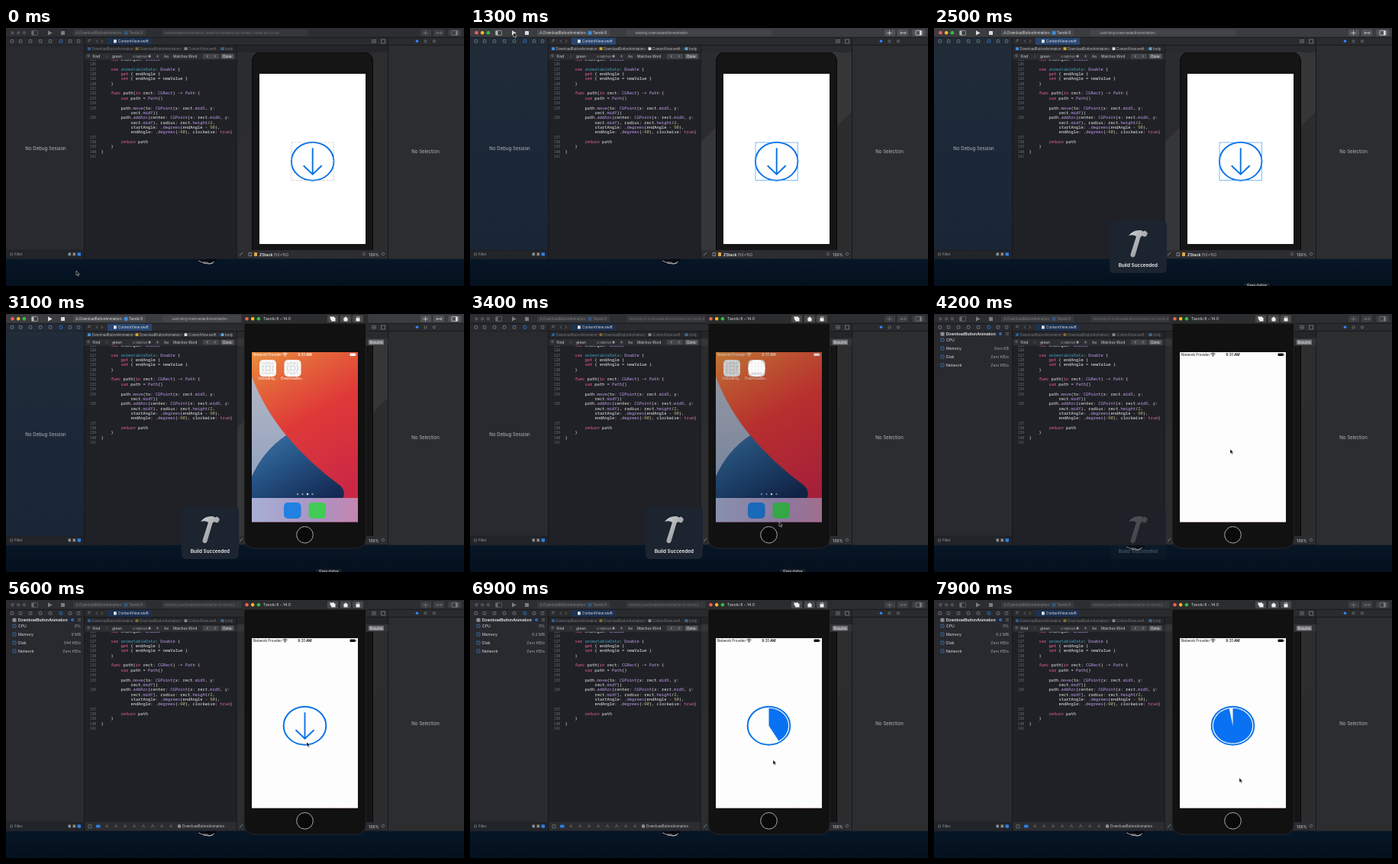
Animation of 600 by 338 pixels, one loop 8 s. Source, as an HTML page:

```html
<!DOCTYPE html>
<html lang="en">
<head>
<meta charset="utf-8">
<title>Download button demo</title>
<style>
html, body { margin: 0; width: 100%; height: 100%; overflow: hidden; background: #06101c; }
svg { display: block; width: 100vw; height: 100vh; }
text { font-family: Inter, "Open Sans", sans-serif; }
.code text { font-family: "Noto Sans Mono", "DejaVu Sans Mono", monospace; font-size: 5.42px; font-weight: 500; }
</style>
</head>
<body>
<svg id="stage" viewBox="0 0 600 338" preserveAspectRatio="none"></svg>
<script>
const LOOP = 8000;
const DEVICE = "Tavoki 8";
const APP = "DownloadButtonAnimation";
const BLUE = "#0a73e6";

const rect = (x, y, w, h, fill, more = "") =>
  `<rect x="${x}" y="${y}" width="${w}" height="${h}" fill="${fill}" ${more}/>`;
const dot = (x, y, r, fill, more = "") => `<circle cx="${x}" cy="${y}" r="${r}" fill="${fill}" ${more}/>`;
const line = (d, stroke, width = 0.7, more = "") =>
  `<path d="${d}" fill="none" stroke="${stroke}" stroke-width="${width}" ${more}/>`;
const label = (x, y, size, str, fill = "#bbb", more = "") =>
  `<text x="${x}" y="${y}" font-size="${size}" fill="${fill}" ${more}>${str}</text>`;
const group = (id, body, more = "") => `<g id="${id}" ${more}>${body}</g>`;
const MID = ' text-anchor="middle"', END = ' text-anchor="end"', BOLD = ' font-weight="600"';

const LIGHTS = ["#fc5b57", "#fdbc2e", "#29c740"];
const GREYS = LIGHTS.map(() => "#505155");
const lights = (x, colors = LIGHTS) => colors.map((c, i) => dot(x + i * 7.7, 6.3, 2.2, c)).join("");

const downArrow = (x, y) =>
  line(`M${x} ${y - 17.5}V${y + 17}M${x - 12} ${y + 5.5}L${x} ${y + 17}L${x + 12} ${y + 5.5}`, BLUE, 1.9);
const ring = (x, y) =>
  `<ellipse cx="${x}" cy="${y}" rx="27.8" ry="25" fill="none" stroke="${BLUE}" stroke-width="2"/>`;

// Source editor: [line number, indent, text]
const CODE = [
  [125, 4, "var endAngle: Double"], [126, 0, ""],
  [127, 4, "var animatableData: Double {"],
  [128, 8, "get { endAngle }"], [129, 8, "set { endAngle = newValue }"],
  [130, 4, "}"], [131, 0, ""],
  [132, 4, "func path(in rect: CGRect) -> Path {"],
  [133, 8, "var path = Path()"], [134, 0, ""],
  [135, 8, "path.move(to: CGPoint(x: rect.midX, y:"], ["", 12, "rect.midY))"],
  [136, 8, "path.addArc(center: CGPoint(x: rect.midX, y:"],
  ["", 12, "rect.midY), radius: rect.height/2,"],
  ["", 12, "startAngle: .degrees(endAngle - 90),"],
  ["", 12, "endAngle: .degrees(-90), clockwise: true)"],
  [137, 0, ""], [138, 8, "return path"], [139, 4, "}"], [140, 0, "}"], [141, 0, ""]
];
const TOKENS = [
  [/^(var|get|set|func|in|return|true)$/, "#f7619f"],
  [/^(Double|CGRect|CGPoint|Path|midX|midY|height|addArc|move|degrees)$/, "#c79ff5"],
  [/^animatableData$/, "#42a2bd"],
  [/^\d+$/, "#d0bf69"]
];
const colorize = str => str.replace(/>/g, "\u203a").replace(/\w+/g, word => {
  const hit = TOKENS.find(([pattern]) => pattern.test(word));
  return hit ? `<tspan fill="${hit[1]}">${word}</tspan>` : word;
}).replace(/\u203a/g, "&gt;");
const code = CODE.map(([num, indent, str], i) => {
  const y = 43 + i * 6.35;
  return `<text x="118" y="${y}" fill="#74757a" style="font-size:4.6px" ${END}>${num}</text>`
    + `<text x="${124.4 + indent * 3.25}" y="${y}" fill="#ececee">${colorize(str)}</text>`;
}).join("");

const defs = `<defs>
  <linearGradient id="sea" x2="0" y2="1"><stop stop-color="#0b1a2b"/><stop offset=".9" stop-color="#071626"/><stop offset="1" stop-color="#04101d"/></linearGradient>
  <linearGradient id="side" x2="0" y2="1"><stop stop-color="#222c39"/><stop offset=".5" stop-color="#1c2838"/><stop offset="1" stop-color="#1a2636"/></linearGradient>
  <linearGradient id="warm" x2=".35" y2="1"><stop stop-color="#ea9040"/><stop offset=".22" stop-color="#e4653a"/><stop offset=".5" stop-color="#df3a38"/><stop offset="1" stop-color="#cb2745"/></linearGradient>
  <linearGradient id="wave" x2=".8" y2="1"><stop stop-color="#3a74a8"/><stop offset=".5" stop-color="#245081"/><stop offset="1" stop-color="#142a54"/></linearGradient>
  <linearGradient id="pale" x2="0" y2="1"><stop stop-color="#b3b6c4"/><stop offset="1" stop-color="#93a3c0"/></linearGradient>
  <linearGradient id="dock"><stop stop-color="#a7b0d4"/><stop offset=".6" stop-color="#aa94c4"/><stop offset="1" stop-color="#c486ae"/></linearGradient>
  <linearGradient id="metal" x2="1" y2="1"><stop stop-color="#d0d1d3"/><stop offset="1" stop-color="#85898d"/></linearGradient>
  <clipPath id="codeClip"><rect x="103" y="41.5" width="199" height="249"/></clipPath>
  <clipPath id="canvasClip"><rect x="302" y="32" width="198" height="259"/></clipPath>
  <clipPath id="screenClip"><rect x="322" y="50" width="139" height="222.5"/></clipPath>
</defs>`;

const desktop = rect(0, 0, 600, 338, "url(#sea)")
  + `<path d="M250 306l6-3 5 1 4-3 9 1 3 4-7 1-5 3-9-1z" fill="#04080d"/>`
  + line("M252 305l5 2 6 0 4 2 6-3M258 308l8 1 5-1", "#b8bfc4", 0.9);

const toolbar = rect(0, 0, 600, 12.3, "#323337", 'id="bar"')
  + lights(8.5, GREYS) + group("macLights", lights(8.5))
  + group("tools",
      `<rect x="33.5" y="3.4" width="8" height="6" rx="1" fill="none" stroke="#bbb" stroke-width=".7"/>`
      + rect(34, 4, 2.5, 5, "#bbb")
      + `<path d="M55 3.2l5.6 3.2-5.6 3.2z" fill="#ddd"/>` + rect(72, 4, 5, 5, "#ddd", 'rx=".5"')
      + rect(88, 2, 95, 8.6, "#47484b", 'rx="1.5"')
      + line("M91 8.2l2-4 2 4M91.7 7h2.6", "#ccc", 0.5)
      + label(96, 8, 4.4, APP, "#e2e2e4") + label(152, 8, 4.6, "›", "#aaa")
      + rect(155, 4, 4.5, 4.8, "#3b8fe0", 'rx="1"') + label(161, 8, 4.6, DEVICE, "#e2e2e4")
      + rect(205, 2, 190, 8.6, "#434447", 'rx="1.5"')
      + `<text id="status" x="208" y="7.8" font-size="4.1" fill="#bcbdc0"></text>`
      + [543, 560, 579.5].map(x => rect(x, 2, x > 575 ? 17 : 14, 8.6, "#515256", 'rx="1.5"')).join("")
      + line("M546.5 6.5h6M549.5 3.5v6M564 6.5h7M565.5 5l-1.7 1.5 1.7 1.5M569.5 5l1.7 1.5-1.7 1.5", "#ddd")
      + `<rect x="584" y="3.4" width="8" height="6" rx="1" fill="none" stroke="#ddd" stroke-width=".7"/>` + rect(589, 4, 2.5, 5, "#ddd"));

const navIcons = [8, 19, 32, 45, 58, 72, 84, 95].map((x, i) =>
  rect(x - 1.8, 15.5, 3.6, 3.6, "none", `rx=".8" stroke="${i === 5 ? "#2f8cf4" : "#8c8e93"}" stroke-width=".7"`)).join("");

const chevron = (x, y) => line(`M${x} ${y - 1.5}l1.5 1.5-1.5 1.5`, "#888", 0.5);
const crumb = (x, str, icon) => rect(x - 5.5, 25.2, 4, 3.8, icon, 'rx=".6"') + label(x, 28.7, 4.3, str, "#c2c3c6");
const tabs = rect(103, 12.3, 497, 10.2, "#2a2b2e")
  + rect(133, 12.3, 58, 10.2, "#26446d", 'id="tab"')
  + line("M107 17.3h3M108 15.5h3M120 15.5l-1.7 1.8 1.7 1.8M125 15.5l1.7 1.8-1.7 1.8", "#888")
  + rect(141, 15.2, 3.8, 4.2, "#e4e4e6", 'rx=".6"') + label(147, 19.2, 4.7, "ContentView.swift", "#dcdde0")
  + line("M479 15.6h6M479 17.4h6M479 19.2h6M491.5 15h5v5h-5z", "#999", 0.6)
  + dot(538.5, 17.3, 1.8, "#2f8cf4") + dot(549.5, 17.3, 1.6, "none", 'stroke="#999" stroke-width=".6"') + dot(561, 17.3, 1.6, "none", 'stroke="#999" stroke-width=".6"');

const editor = rect(103, 22.5, 199, 280, "#202126")
  + `<g class="code" clip-path="url(#codeClip)">${code}</g>`
  + group("crumbs", rect(103, 22.5, 397, 9.5, "#292a2e")
    + crumb(112.5, APP, "#3b8fe0") + chevron(166.5, 27.2) + crumb(175, APP, "#d3a72e") + chevron(229.5, 27.2)
    + crumb(239, "ContentView.swift", "#d8d9dc") + chevron(279, 27.2) + crumb(287, "body", "#57a5d8"))
  + rect(103, 32, 199, 9.5, "#2d2e32")
  + dot(108, 36.3, 1.3, "none", 'stroke="#aaa" stroke-width=".5"')
  + label(113.5, 38.6, 4.7, "Find", "#e2e2e4") + chevron(131.5, 37)
  + label(139, 38.6, 4.7, "green", "#d5d5d8") + label(166, 38.5, 3.8, "0 matches", "#a9aaae")
  + dot(188, 37, 1.7, "#999") + line("M196.5 37h4M198.5 35v4", "#aaa", 0.5)
  + label(207, 38.6, 4.7, "Aa") + label(219, 38.6, 4.6, "Matches Word", "#cfcfd2")
  + rect(258, 33.7, 21, 6.6, "#444549", 'rx="1.2"') + line("M264.5 35.4l-1.6 1.6 1.6 1.6M273 35.4l1.6 1.6-1.6 1.6", "#ccc", 0.6)
  + rect(281.5, 33.7, 17, 6.6, "#55565a", 'rx="1.2"') + label(290, 38.7, 4.7, "Done", "#f1f1f2", MID);

const preview = rect(302, 32, 198, 270, "#2b2c2e")
  + `<g clip-path="url(#canvasClip)">`
  + `<path id="sheen" d="M302 150L420 32H500V110L320 291H302z" fill="#353638"/>`
  + rect(322.5, 32, 158, 300, "#151516", 'rx="11" stroke="#070707"')
  + rect(332, 60, 139, 223, "#fff") + `</g>`
  + ring(401.7, 174.7) + downArrow(401.7, 174.7)
  + rect(374, 150, 55.5, 49.5, "none", 'id="selection" stroke-width=".7"')
  + rect(302, 291, 198, 11, "#2c2d30")
  + line("M306 298l4-4M318 294.5h3.5v4H318z", "#aaa", 0.7) + rect(325, 294, 4, 5, "#e0a64e", 'rx=".8"')
  + label(332, 298.6, 5.2, "ZStack", "#eee", BOLD) + label(350.5, 298.6, 5, "150×150", "#b2b3b6")
  + dot(469, 296, 1.7, "none", 'stroke="#888" stroke-width=".6"') + label(482, 298.5, 5, "100%", "#dcdde0", MID)
  + dot(494, 296, 1.7, "none", 'stroke="#888" stroke-width=".6"');

const rows = ["CPU", "Memory", "Disk", "Network"].map((name, i) => {
  const y = [34, 45, 56, 67][i];
  return rect(9, y - 2, 4, 4, "none", 'rx=".7" stroke="#3f8fe6" stroke-width=".7"')
    + label(16, y + 1.9, 5.1, name, "#e0e1e4")
    + `<text id="gauge${i}" x="98" y="${y + 1.9}" font-size="5.1" fill="#a6a8ad" ${END}></text>`;
}).join("");

const sidebar = rect(0, 12.3, 102.5, 290, "#282a2f", 'id="side0"') + rect(0, 12.3, 102.5, 290, "url(#side)", 'id="side1"')
  + rect(0, 291, 102.5, 11.5, "#212429")
  + navIcons + line("M0 22.5H102.5M0 291H102.5", "#17191d", 0.5)
  + group("noSession", label(52, 159.5, 6.1, "No Debug Session", "#b9bbc0", MID))
  + group("gauges", rect(8.5, 23.7, 5, 5, "#8a8d92", 'rx="1"')
    + label(16, 28, 5, APP, "#f0f0f2", BOLD) + dot(87, 26, 1.9, "#2672cb") + line("M94 24.7h4M94 27.1h4", "#999", 0.6) + rows)
  + dot(7, 296.4, 1.6, "none", 'stroke="#999" stroke-width=".6"') + label(11, 298.2, 4.4, "Filter", "#a3a5aa")
  + rect(81.5, 294.4, 3.6, 3.8, "#888") + rect(87.5, 294.4, 3.6, 3.8, "#888") + rect(93.5, 294.2, 4.5, 4.2, "#2f80e8", 'rx=".6"');

const debugBar = group("debugBar", rect(103, 291, 199, 11, "#2c2d30")
  + line("M108 294.5h4v4h-4z", "#888", 0.6) + rect(118, 294.6, 5.5, 3.6, "#2f80e8", 'rx=".8"')
  + [132, 144, 156, 168, 180, 192, 204, 216].map(x => line(`M${x - 1.7} 298l1.8-3.4 1.8 3.4`, "#85868a", 0.6)).join("")
  + rect(225, 294.2, 4, 4.2, "#8c8e92", 'rx=".7"') + label(231, 298.2, 4.4, APP, "#c5c6c9"));

const inspector = rect(501, 22.5, 99, 280, "#2c2d2f") + label(549.5, 164.4, 6.1, "No Selection", "#b9babd", MID);
const ideWindow = rect(0, 0, 600, 302.5, "#202124") + preview + editor + tabs + sidebar + inspector + debugBar + toolbar
  + line("M102.7 12V302.5M302.3 22V302.5M500.5 12V302.5M0 12.3H600M103 22.5H600M103 32H302", "#131416", 0.7);

const bezel = group("bezel", rect(230, 253, 75, 68, "#1b242f", 'rx="5"')
  + `<path d="M255 272q6-8 16-7l3 1.5 3-1 3 3.5-2 4-3 .5-2-1.5-2.5 2-7 24q-1.3 3-4 2t-1.8-4L265 273q-4-3-10-1z" fill="url(#metal)"/>`
  + label(267.3, 312.5, 6.3, "Build Succeeded", "#f4f4f5", MID + BOLD));

const appIcon = (x, name) => {
  let grid = "";
  for (let i = 1; i < 5; i++) grid += `M${x - 11} ${60 + i * 4.4}h22M${x - 11 + i * 4.4} 60v22`;
  return rect(x - 11, 60, 22, 22, "#fbfbfb", 'rx="5"') + line(grid, "#c9c9c9", 0.35)
    + dot(x, 71, 7, "none", 'stroke="#bbb" stroke-width=".5"') + dot(x, 71, 3.5, "none", 'stroke="#bbb" stroke-width=".5"')
    + label(x, 85.6, 4.5, name, "#fff", MID);
};
const statusBar = (color, id) => group(id,
  label(324, 55, 4.5, "Network Provider", color)
  + line("M362.5 52.2q3-2 6 0M363.7 53.7q1.8-1.2 3.6 0", color, 0.9) + dot(365.5, 55, 0.7, color)
  + label(391.5, 55, 4.7, "9:31 AM", color, MID + BOLD) + rect(450.5, 51.6, 7.2, 3.5, color, 'rx=".8"') + rect(458, 52.6, 0.7, 1.5, color));

const home = rect(322, 50, 139, 223, "url(#warm)")
  + `<path d="M322 82Q338 124 367 159Q337 180 322 214z" fill="url(#pale)"/>`
  + `<path d="M322 213Q337 179 367 159Q397 195 438 225Q446 233 441 242H322z" fill="url(#wave)"/>`
  + rect(322, 241, 139, 32, "url(#dock)")
  + [382, 388.5, 395, 401.5].map((x, i) => dot(x, 236, 1.2, "#fff", `opacity="${i === 2 ? 1 : 0.45}"`)).join("")
  + appIcon(343, "Unloading…") + appIcon(375.5, "Downloadbu…")
  + rect(364, 247, 22.5, 21, "#2180e2", 'rx="5"') + rect(396.5, 247, 22.5, 21, "#42cb55", 'rx="5"')
  + statusBar("#fff", "homeStatus")
  + rect(322, 50, 139, 223, "#000", 'id="shade"');

const simulator = group("sim",
  rect(302.5, 32, 198, 9.5, "#343537") + rect(475, 33.8, 20, 6.5, "#77787a", 'rx="1.3"') + label(485, 38.6, 4.5, "Resume", "#e5e5e5", MID)
  + `<path d="M312 12H471.5V293Q471.5 307 457 307H327Q312 307 312 293z" fill="#111112" stroke="#2b2b2d" stroke-width=".8"/>`
  + rect(308.5, 0, 166, 12.5, "#2b2c2e", 'rx="1.5"') + lights(315.5)
  + label(337, 8.2, 5.2, `${DEVICE} – 14.0`, "#d8d8da")
  + [428, 445, 461].map(x => rect(x - 7, 1.5, 14, 9.6, "#48494b", 'rx="1.5"')).join("")
  + `<path d="M424.5 3.5h5.5v1.2h1.5v4.8h-5l-2-4z" fill="#eee"/>`
  + `<path d="M441.5 6.4l3.5-3 3.5 3h-1v3.2h-5V6.4z" fill="#eee"/>` + rect(458.5, 5.2, 5, 4.3, "#eee") + line("M459 4.5q2-2 4.5 0", "#eee")
  + `<g clip-path="url(#screenClip)">${home}`
  + `<rect id="card" fill="#fdfdfd"/><path id="cardGrid" fill="none" stroke="#e3dfe0" stroke-width=".4"/><rect id="cardBox" fill="#dedede"/>`
  + group("appView", statusBar("#111", "appStatus")
    + group("button", ring(391.5, 164.7) + group("arrow", downArrow(391.5, 164.7)) + `<path id="pie" fill="#0872f3"/>`)) + `</g>`
  + dot(391.5, 289.3, 10.8, "#0a0a0b", 'stroke="#bcbcbe" stroke-width=".9"'));

const tooltip = group("tooltip", rect(406, 334, 34, 8, "#1a2027", 'rx="2"') + label(423, 340.2, 6, "Simulator", "#e8e8e8", MID));
const pointer = `<path id="pointer" d="M0 0v6l1.4-1.2 1 2.2 1-.5-1-2.1h1.9z" fill="#080808" stroke="#e8e8e8" stroke-width=".5"/>`;

document.getElementById("stage").innerHTML = defs + desktop + ideWindow + bezel + simulator + tooltip + pointer;

const el = id => document.getElementById(id);
const set = (id, attrs) => { for (const key in attrs) el(id).setAttribute(key, attrs[key]); };
const show = (id, amount) => set(id, { opacity: +amount });
const clamp = v => Math.max(0, Math.min(1, v));
const ramp = (t, from, to) => clamp((t - from) / (to - from));
const smooth = p => p * p * (3 - 2 * p);
const mix = (a, b, p) => a + (b - a) * p;
const latest = (steps, t) => steps.filter(step => step[0] <= t).pop()[1];

const STATUS = [
  [0, `${APP} | Build for Previews Succeeded | Today at 9:31 AM`],
  [1200, `Building ${APP}…`], [2000, `Launching ${APP}…`],
  [3400, `Attaching to ${APP} on ${DEVICE}`], [4700, `Running ${APP} on ${DEVICE}`]
];
const GAUGES = [
  [[0, ""], [4700, "0%"], [6500, "3%"]],
  [[0, "Zero KB"], [4700, "9 MB"], [6500, "9.2 MB"]],
  [[0, "Zero KB/s"], [4700, "344 KB/s"], [6200, "Zero KB/s"]],
  [[0, "Zero KB/s"]]
];
const POINTER = [
  [0, 92, 318], [150, 92, 318], [900, 57, 6], [1900, 57, 6], [2400, 422, 342], [3100, 422, 342],
  [3600, 396, 235], [4200, 388, 177], [5400, 394, 186], [6600, 394, 186], [7200, 400, 233], [8000, 400, 233]
];

function piePath(progress) {
  if (progress <= 0) return "";
  const cx = 391.5, cy = 164.7, rx = 25.6, ry = 22.9;
  const angle = Math.min(progress, 0.9999) * 2 * Math.PI;
  const x = cx + rx * Math.sin(angle), y = cy - ry * Math.cos(angle);
  return `M${cx} ${cy}V${cy - ry}A${rx} ${ry} 0 ${+(progress > 0.5)} 1 ${x} ${y}Z`;
}

function drawCard(t) {
  const p = smooth(ramp(t, 3400, 3850));
  const bulge = 10 * Math.sin(p * Math.PI);
  const x = mix(364.5, 322, p), right = mix(386.5, 461, p);
  const y = mix(60, 50, p) + bulge, bottom = mix(82, 273, p) - bulge;
  const w = right - x, h = bottom - y;
  set("card", { x, y, width: w, height: h, rx: 10 * (1 - p), opacity: +(t >= 3400) });
  let grid = "";
  for (let i = 1; i < 5; i++) grid += `M${x} ${y + h * i / 5}h${w}M${x + w * i / 5} ${y}v${h}`;
  const ghost = t >= 3400 ? 1 - p : 0;
  set("cardGrid", { d: grid, opacity: ghost });
  set("cardBox", { x: x + w * 0.2, y: y + h * 0.74, width: w * 0.6, height: h * 0.18, opacity: ghost });
}

function render(t) {
  const active = t >= 1000 && t < 3300;
  const debugging = t >= 3900;

  set("bar", { fill: active ? "#3b3c40" : "#2d2e31" });
  set("tab", { fill: active ? "#28466f" : "#1d3150" });
  show("macLights", active);
  show("tools", active ? 1 : 0.45);
  show("crumbs", active ? 1 : 0.55);
  show("side1", active);
  show("sheen", active ? 1 : 0.15);
  set("selection", { stroke: active ? "#4a9bf0" : "#b5b5b5", "stroke-dasharray": active ? "none" : "2 1.4" });
  el("status").textContent = latest(STATUS, t);
  set("status", { x: t >= 1200 && t < 3400 ? 217 : 208 });

  show("noSession", !debugging);
  show("gauges", debugging);
  GAUGES.forEach((steps, i) => { el("gauge" + i).textContent = latest(steps, t); });
  show("debugBar", t >= 4800);

  show("bezel", ramp(t, 1900, 2000) * (1 - ramp(t, 3950, 4300)));
  show("sim", t >= 2900);
  show("tooltip", t >= 2500 && t < 3800);
  show("shade", 0.3 * ramp(t, 3250, 3500));
  drawCard(t);
  show("appView", t >= 3850);
  show("button", t >= 4900);
  show("arrow", 1 - ramp(t, 5800, 6100));
  set("pie", { d: piePath(ramp(t, 6150, 7955)) });

  const i = Math.max(1, POINTER.findIndex(key => key[0] > t));
  const [t0, x0, y0] = POINTER[i - 1], [t1, x1, y1] = POINTER[i];
  const p = smooth(ramp(t, t0, t1));
  set("pointer", { transform: `translate(${mix(x0, x1, p)} ${mix(y0, y1, p)})` });
}

const start = performance.now();
function tick() {
  render((performance.now() - start) % LOOP);
  requestAnimationFrame(tick);
}
render(0);
requestAnimationFrame(tick);
</script>
</body>
</html>
```
